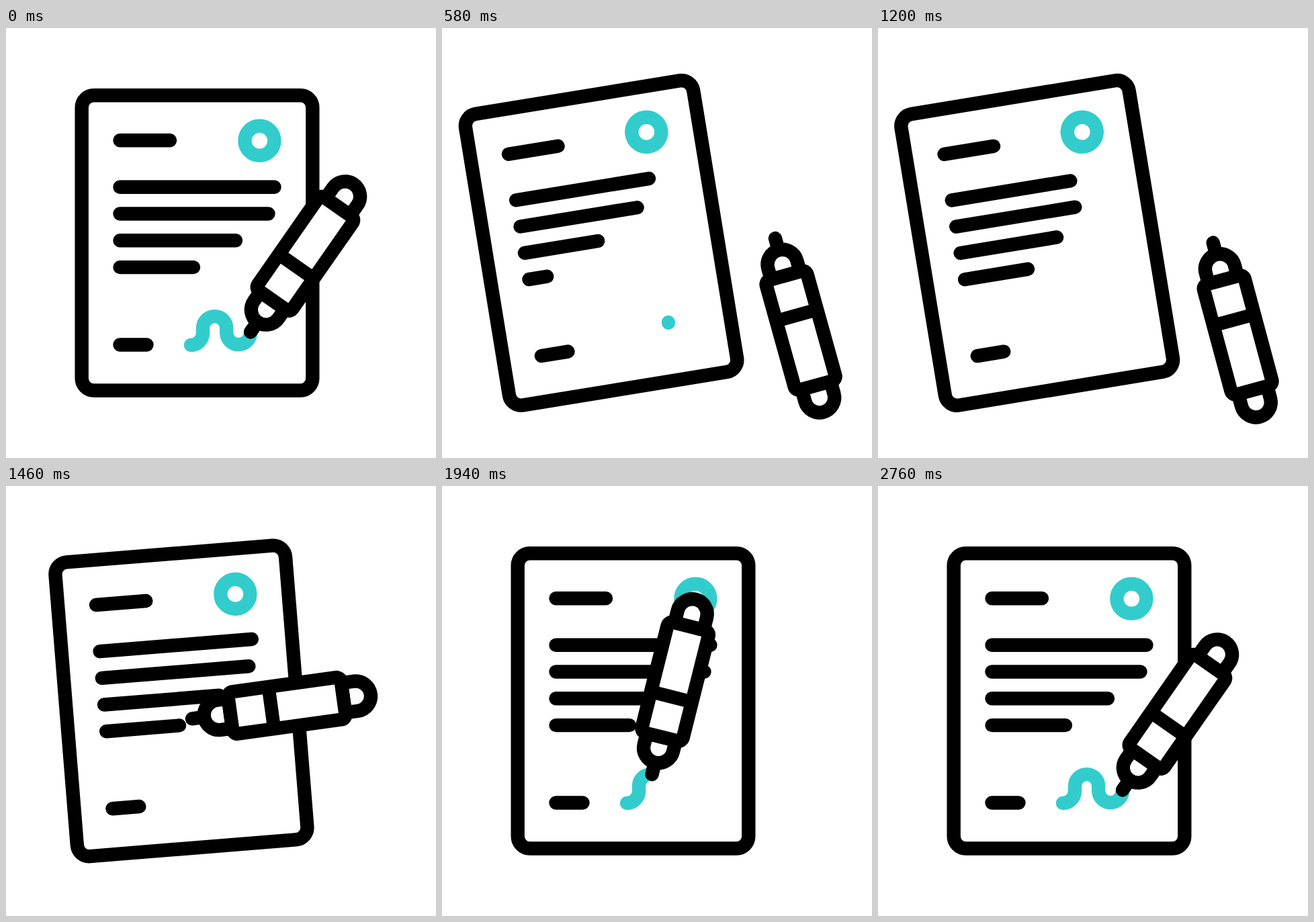
These frames come from a looping animation (640 px wide and 640 px high, 3600 ms). An HTML page:

```html
<!DOCTYPE html>
<html lang="en">
<head>
<meta charset="utf-8">
<title>Signing a document</title>
<style>
  html, body { margin: 0; width: 100%; height: 100%; overflow: hidden; background: #fff; }
  svg { display: block; width: 100vw; height: 100vh; }
  .ink { fill: none; stroke: #000; stroke-width: 20.4; stroke-linecap: round; stroke-linejoin: round; }
  .ink .cap { fill: #fff; }
  .ink .barrel { fill: #000; stroke: none; }
  .ink .window { fill: #fff; stroke: none; }
  .teal { stroke: #3cc; }
</style>
</head>
<body>
<svg viewBox="0 0 640 640">
  <g id="paper" class="ink">
    <rect x="112.7" y="100.3" width="343.6" height="439.2" rx="18"/>
    <path d="M169.5 167.3H244M169.5 471.5H209.5"/>
    <g id="lines"></g>
    <circle class="teal" cx="377.4" cy="167.8" r="22"/>
    <path id="signature" class="teal"
      d="M275 472A18 18 0 0 0 293 454V446.7A17.6 17.6 0 0 1 328.2 446.7V454A17.9 17.9 0 0 0 364 452.5"/>
  </g>
  <!-- The pen lies along x with its tip at the left and its pivot at the origin -->
  <g id="pen" class="ink">
    <g transform="translate(-134.5)">
      <path d="M0 0H14"/>
      <path class="cap" d="M57.5 -22.3H40.5A22.3 22.3 0 0 0 40.5 22.3H57.5Z"/>
      <path class="cap" d="M227 -22.3H246A22.3 22.3 0 0 1 246 22.3H227Z"/>
      <rect class="barrel" x="47.3" y="-41.7" width="190" height="83.4" rx="17"/>
      <path class="window" d="M67.6 -21.4H109V21.4H67.6ZM129 -21.4H217V21.4H129Z"/>
    </g>
  </g>
</svg>
<script>
const LOOP = 3600;
const PIVOT = 134.5; // distance from pen tip to pivot
const AWAY = { x: 542, y: 453.7, angle: 88.7 };

const $ = id => document.getElementById(id);
const clamp = v => Math.min(1, Math.max(0, v));
const mix = (a, b, k) => a + (b - a) * k;
const smooth = v => v * v * (3 - 2 * v);
const easeOut = (v, power) => 1 - (1 - v) ** power;
const progress = (t, start, length) => clamp((t - start) / length);

const signature = $("signature");
const signLength = signature.getTotalLength();

const lines = [230, 221, 172.5, 109.5].map((length, i) => {
  const path = document.createElementNS("http://www.w3.org/2000/svg", "path");
  $("lines").append(path);
  return { path, length, y: 236.7 + 39.8 * i };
});

function show(path, visible) {
  path.style.display = visible ? "" : "none";
}

function trimSignature(from, to) {
  show(signature, to > from);
  signature.setAttribute("stroke-dasharray", `${(to - from) * signLength} ${signLength * 2}`);
  signature.setAttribute("stroke-dashoffset", -from * signLength);
}

// Pen pose with the tip on the signature, leaning further as it writes
function writingPose(written) {
  const tip = signature.getPointAtLength(written * signLength);
  const angle = -55.1 - 36 * (1 - written);
  const rad = angle * Math.PI / 180;
  return { x: tip.x + PIVOT * Math.cos(rad), y: tip.y + PIVOT * Math.sin(rad), angle };
}

function drawPaper(swing) {
  $("paper").setAttribute("transform", `translate(${-47.4 * swing}) rotate(${-9.25 * swing} 284.5 320)`);
}

function drawPen(written, moved, turned, lift) {
  const pose = writingPose(written);
  const x = mix(pose.x, AWAY.x, moved);
  const y = mix(pose.y, AWAY.y, moved) - lift;
  const angle = mix(pose.angle, AWAY.angle, turned);
  $("pen").setAttribute("transform", `translate(${x} ${y}) rotate(${angle})`);
}

function drawLines(t) {
  lines.forEach(({ path, length, y }, i) => {
    const erased = smooth(progress(t, 494, 86 * (4.5 - i)));
    const redrawn = easeOut(progress(t, 925 - 23 * i, 700), 3);
    const shown = redrawn || 1 - erased;
    show(path, shown > 0);
    path.setAttribute("d", `M169.5 ${y}h${length * shown}`);
  });
}

function draw(t) {
  drawLines(t);
  if (t < 1050) {
    const out = smooth(easeOut(progress(t, 0, 1040), 2));
    drawPaper(1.11 * out);
    drawPen(1, out, out, 0);
    trimSignature(smooth(progress(t, 0, 620)), 1);
  } else {
    const travel = smooth(progress(t, 1130, 672));
    const turn = smooth(progress(t, 1077, 732));
    const written = easeOut(progress(t, 1580, 1180), 1.5);
    drawPaper(1.11 * (1 - smooth(progress(t, 1060, 750))));
    drawPen(written, 1 - travel, 1 - turn, 69 * Math.sin(Math.PI * travel) ** 2);
    trimSignature(0, clamp(written * 1.1 - 0.1));
  }
}

const begin = performance.now();
function tick() {
  draw((performance.now() - begin) % LOOP);
  requestAnimationFrame(tick);
}
tick();
</script>
</body>
</html>
```
